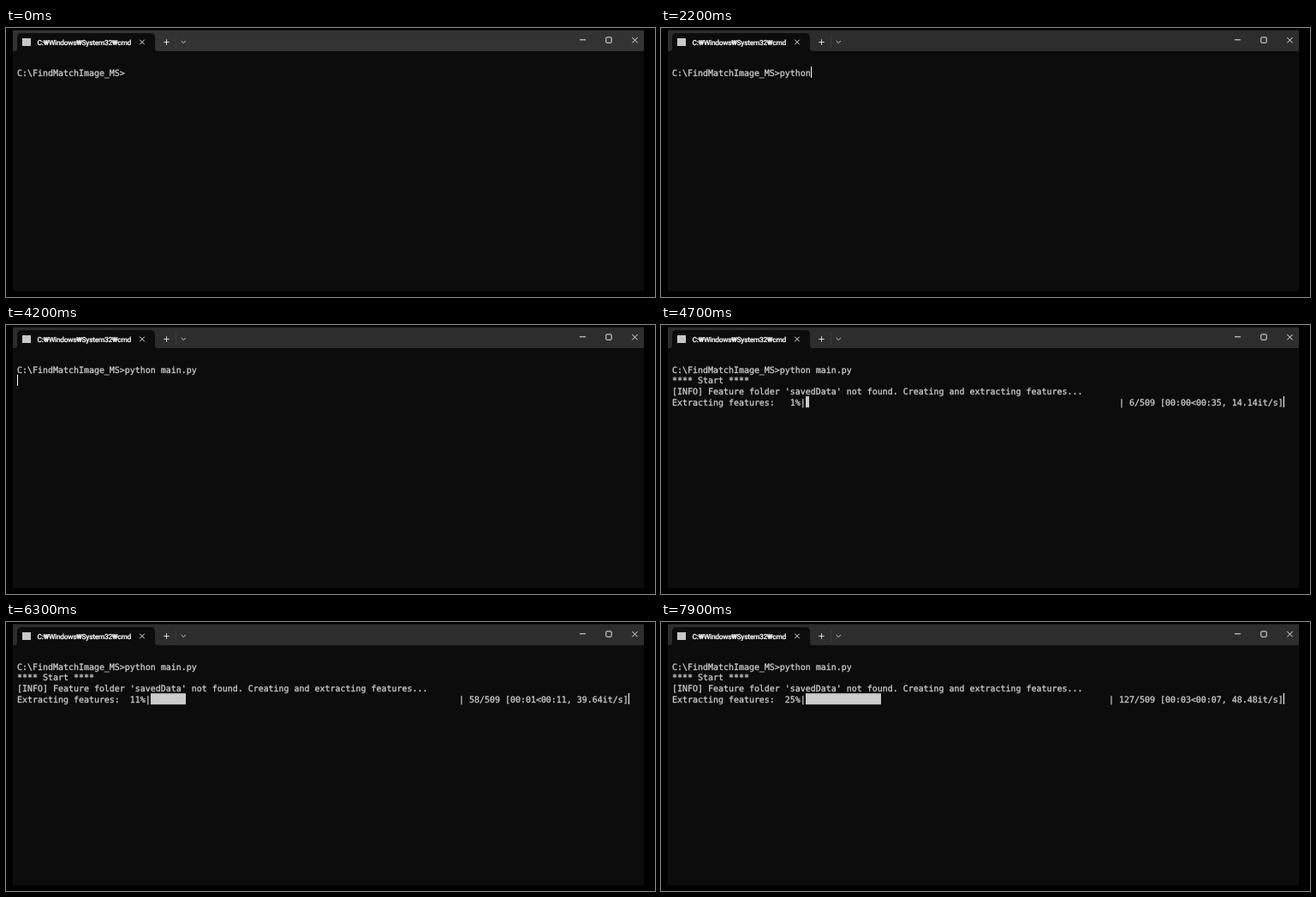
An HTML page with a canvas that plays this animation: 758 px wide and 314 px high, repeating every 8000 ms.

```html
<!DOCTYPE html>
<html lang="en">
<head>
<meta charset="utf-8">
<title>Terminal</title>
<style>
  html, body { margin: 0; width: 100%; height: 100%; overflow: hidden; background: #000; }
  canvas { display: block; }
</style>
</head>
<body>
<canvas id="stage" width="758" height="314"></canvas>
<script>
const ctx = document.getElementById('stage').getContext('2d');
const LOOP = 8000, STEP = 100;
const LEFT = 13, CELL = 6, TOP = 45.3, LINE = 12.65, COLS = 119;
const TOTAL = 509, RUN_START = 4500;
const MONO = '9.966px "DejaVu Sans Mono", "Noto Sans Mono", monospace';
const UI = '500 8.4px Roboto, "Noto Sans", "Noto Sans CJK KR", sans-serif';

// command text after each key press
const keys = [
  [1700, 'p'], [1800, 'py'], [1900, 'pyt'], [2000, 'pyth'], [2100, 'pytho'], [2200, 'python'],
  [2600, 'python '], [2900, 'python'], [3100, 'python '], [3200, 'python m'],
  [3400, 'python mai'], [3500, 'python main'], [3700, 'python main.'],
  [3900, 'python main.p'], [4000, 'python main.py']
];

// time, items done, items per second
const progress = [
  [4500, 0, 11], [5400, 25, 25.11], [6300, 58, 39.64], [7000, 89, 35.18], [7900, 127, 48.48]
];

ctx.textRendering = 'geometricPrecision';

const lerp = (a, b, k) => a + (b - a) * k;
const pad = n => String(n).padStart(2, '0');
const clock = s => pad(Math.floor(s / 60)) + ':' + pad(Math.floor(s % 60));
const rowTop = row => TOP + row * LINE;

function box(x, y, w, h, color) {
  ctx.fillStyle = color;
  ctx.fillRect(x, y, w, h);
}

function path(color, ...lines) {
  ctx.strokeStyle = color;
  ctx.lineWidth = 1;
  ctx.beginPath();
  for (const [x, y, ...rest] of lines) {
    ctx.moveTo(x, y);
    for (let i = 0; i < rest.length; i += 2) ctx.lineTo(rest[i], rest[i + 1]);
  }
  ctx.stroke();
}

function cross(x, y, r, color) {
  path(color, [x - r, y - r, x + r, y + r], [x + r, y - r, x - r, y + r]);
}

// a hairline outline gives the slightly heavier terminal weight
function label(text, x, y, font, color, weight) {
  ctx.font = font;
  ctx.fillStyle = ctx.strokeStyle = color;
  ctx.lineWidth = weight;
  ctx.lineJoin = 'round';
  ctx.fillText(text, x, y);
  ctx.strokeText(text, x, y);
}

function print(text, row, col = 0) {
  label(text, LEFT + col * CELL, Math.round(rowTop(row) + 10.4), MONO, '#cccccc', 0.3);
}

function cursor(row, col) {
  box(LEFT + col * CELL, Math.round(rowTop(row)), 1, 13, '#ffffff');
}

function drawWindow(t) {
  const focus = Math.min(1, Math.max(0, (t - 500) / 300));
  const gray = Math.round(lerp(51, 45, focus));
  box(0, 0, 758, 314, '#000000');
  box(8, 2.6, 737, 304.6, '#0c0c0c');
  box(8, 2.6, 737, 24.4, `rgb(${gray},${gray},${gray})`);

  ctx.fillStyle = '#0c0c0c';
  ctx.beginPath();
  ctx.moveTo(10, 27);
  ctx.quadraticCurveTo(13, 27, 13, 24);
  ctx.lineTo(13, 11);
  ctx.quadraticCurveTo(13, 6, 18, 6);
  ctx.lineTo(169, 6);
  ctx.quadraticCurveTo(174, 6, 174, 11);
  ctx.lineTo(174, 24);
  ctx.quadraticCurveTo(174, 27, 177, 27);
  ctx.fill();

  box(19, 12, 10, 9, '#c8c8c8');
  ctx.letterSpacing = '-0.25px';
  label('C:₩Windows₩System32₩cmd', 36.5, 20, UI, '#ffffff', 0.2);
  ctx.letterSpacing = '0px';
  cross(159, 16.5, 2.8, '#e8e8e8');
  path('#d8d8d8', [184.3, 16.5, 190.7, 16.5], [187.5, 13.3, 187.5, 19.7]);
  path('#3c3c3c', [198.5, 9, 198.5, 23]);
  path('#c4c4c4', [204.7, 15, 207.3, 17.6, 209.9, 15]);

  path('#e8e8e8', [670, 13.8, 677, 13.8]);
  ctx.beginPath();
  ctx.roundRect(700.8, 10.9, 6.4, 6.4, 1);
  ctx.stroke();
  cross(734.5, 14.2, 3.2, '#e8e8e8');
}

function drawProgress(t) {
  let i = 1;
  while (i < progress.length - 1 && t > progress[i][0]) i++;
  const [t0, n0, r0] = progress[i - 1], [t1, n1, r1] = progress[i];
  const k = (t - t0) / (t1 - t0);
  const n = Math.round(lerp(n0, n1, k)), rate = lerp(r0, r1, k);

  const left = n ? clock((TOTAL - n) / rate) : '?';
  const speed = n ? rate.toFixed(2) : '?';
  const spent = clock((t - RUN_START + 20) / 1000);
  const head = 'Extracting features: ' + String(Math.round(n / TOTAL * 100)).padStart(3) + '%|';
  const tail = `| ${n}/${TOTAL} [${spent}<${left}, ${speed}it/s]`;
  const width = COLS - head.length - tail.length;
  const filled = Math.floor(n / TOTAL * width * 8) / 8;

  print(head, 3);
  box(LEFT + head.length * CELL, rowTop(3), Math.ceil(filled * CELL), 13, '#cccccc');
  print(tail, 3, COLS - tail.length);
  cursor(3, COLS);
}

function draw(time) {
  const t = Math.floor(time % LOOP / STEP) * STEP;
  drawWindow(t);
  const prompt = 'C:\\FindMatchImage_MS>';
  let typed = '';
  for (const [at, text] of keys) if (t >= at) typed = text;
  print(prompt + typed, 0);

  if (t >= RUN_START) {
    print('**** Start ****', 1);
    print("[INFO] Feature folder 'savedData' not found. Creating and extracting features...", 2);
    drawProgress(t);
  } else if (t >= 4200) {
    cursor(1, 0);
  } else if (t >= 1700 || (t >= 700 && t < 1200)) {
    cursor(0, prompt.length + typed.length);
  }
}

const start = performance.now();
function tick() {
  draw(performance.now() - start);
  requestAnimationFrame(tick);
}
tick();
</script>
</body>
</html>
```
